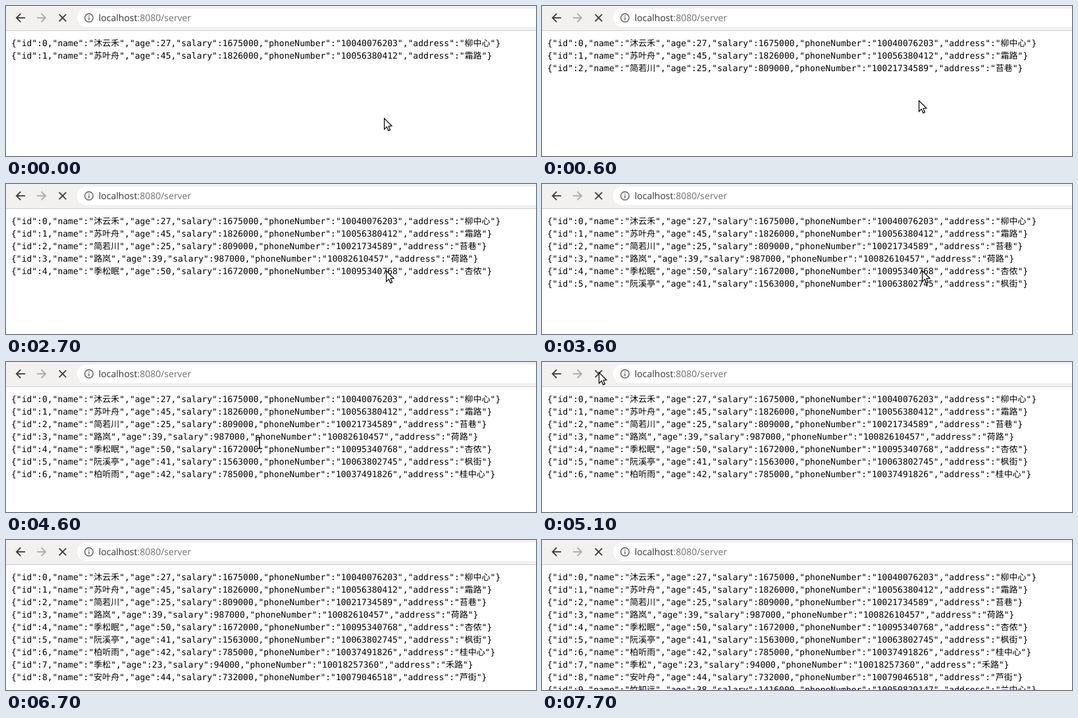
Write an HTML page with a canvas that moves like this. It is 805 by 228 pixels and loops after 8100 ms.

```html
<!DOCTYPE html>
<html lang="zh-CN">
<head>
<meta charset="utf-8">
<title>localhost:8080/server</title>
<style>
html, body { margin: 0; width: 100%; height: 100%; overflow: hidden; background: #fff; }
canvas { display: block; }
</style>
</head>
<body>
<canvas id="stage" width="805" height="228"></canvas>
<script>
const ctx = document.getElementById('stage').getContext('2d');
const LOOP = 8100;
const MONO = '13px "DejaVu Sans Mono", "Noto Sans CJK SC", "Noto Sans CJK", monospace';
const SANS = '14px "Open Sans", "Noto Sans", sans-serif';

// arrival time, name, age, salary, phone, address
const people = [
  [0, '沐云禾', 27, 1675000, '10040076203', '柳中心'],
  [0, '苏叶舟', 45, 1826000, '10056380412', '霜路'],
  [600, '简若川', 25, 809000, '10021734589', '苔巷'],
  [1600, '路岚', 39, 987000, '10082610457', '荷路'],
  [2700, '季松眠', 50, 1672000, '10095340768', '杏侬'],
  [3600, '阮溪亭', 41, 1563000, '10063802745', '枫街'],
  [4600, '柏听雨', 42, 785000, '10037491826', '桂中心'],
  [5600, '季松', 23, 94000, '10018257360', '禾路'],
  [6700, '安叶舟', 44, 732000, '10079046518', '芦街'],
  [7700, '竹知远', 38, 1416000, '10050829147', '兰中心']
];
const rows = people.map(([at, name, age, salary, phoneNumber, address], id) =>
  ({ at, text: JSON.stringify({ id, name, age, salary, phoneNumber, address }) }));

// pointer positions: time, x, y, shape
const pointer = [
  [0, 574, 170, arrow], [400, 571, 163, arrow],
  [600, 572, 143, arrow], [700, 574, 137, arrow],
  [800, 576, 133, arrow], [900, 577, 131, arrow],
  [4300, 561, 130, beam], [4400, 512, 128, beam],
  [4500, 448, 126, beam], [4600, 385, 123, beam],
  [4700, 318, 101, beam], [4800, 248, 73, beam],
  [4900, 178, 44, arrow], [5000, 117, 20, arrow],
  [5100, 86, 15, arrow], [5200, 82, 11, arrow],
  [5300, 76, 8, arrow], [5400, 0, 0, null]
];

function line(points, color, width) {
  ctx.beginPath();
  points.forEach(([x, y]) => ctx.lineTo(x, y));
  ctx.strokeStyle = color;
  ctx.lineWidth = width;
  ctx.stroke();
}

function write(text, x, y, font, color) {
  ctx.font = font;
  ctx.fillStyle = color;
  ctx.fillText(text, x, y);
  return x + ctx.measureText(text).width;
}

function arrow(x, y) {
  ctx.save();
  ctx.translate(x, y);
  ctx.beginPath();
  [[.6, .9], [.6, 17.4], [4.4, 13.8], [7, 19.6], [9.6, 18.5], [7.1, 12.7], [12, 12.3]]
    .forEach(([px, py]) => ctx.lineTo(px, py));
  ctx.closePath();
  ctx.fillStyle = '#fff';
  ctx.fill();
  ctx.strokeStyle = '#000';
  ctx.lineWidth = 1.2;
  ctx.stroke();
  ctx.restore();
}

function beam(x, y) {
  ctx.save();
  ctx.translate(x, y);
  for (const [color, width] of [['#fff', 3.5], ['#000', 1.5]]) {
    line([[0, -7.5], [0, 7.5]], color, width);
    for (const s of [-1, 1]) {
      line([[-4, 8.5 * s], [-1, 8.5 * s], [0, 7.5 * s], [1, 8.5 * s], [4, 8.5 * s]], color, width);
    }
  }
  ctx.restore();
}

function navArrow(cx, dir, color) {
  const at = (x, y) => [cx + x * dir, 18 + y];
  line([at(7, 0), at(-6, 0)], color, 1.8);
  line([at(.3, -6.4), at(-6.1, 0), at(.3, 6.4)], color, 1.8);
}

function toolbar() {
  ctx.fillStyle = '#f2f1f0';
  ctx.fillRect(0, 0, 805, 37);
  ctx.fillStyle = '#d0cfcd';
  ctx.fillRect(0, 37, 805, 1);

  ctx.fillStyle = '#fff';
  ctx.beginPath();
  ctx.roundRect(108, 4, 740, 28, 14);
  ctx.fill();

  navArrow(22, 1, '#3b3b3b');
  navArrow(54, -1, '#b1aaa6');
  line([[80.7, 12.7], [91.3, 23.3]], '#3b3b3b', 1.8);
  line([[91.3, 12.7], [80.7, 23.3]], '#3b3b3b', 1.8);

  ctx.beginPath();
  ctx.arc(126, 18, 6.3, 0, Math.PI * 2);
  ctx.strokeStyle = '#5b5b5b';
  ctx.lineWidth = 1.4;
  ctx.stroke();
  line([[126, 17.2], [126, 21.5]], '#5b5b5b', 1.5);
  line([[126, 14.4], [126, 15.9]], '#5b5b5b', 1.5);

  const x = write('localhost', 140.8, 23, SANS, '#333');
  write(':8080/server', x, 23, SANS, '#707070');
}

function draw(t) {
  ctx.fillStyle = '#fff';
  ctx.fillRect(0, 0, 805, 228);
  toolbar();
  rows.forEach((row, i) => {
    if (t >= row.at) write(row.text, 8, 61 + 19 * i, MONO, '#000');
  });
  const [, x, y, shape] = pointer.filter(p => p[0] <= t).pop();
  if (shape) shape(x, y);
}

// keeps fractional glyph advances
ctx.textRendering = 'geometricPrecision';

function tick() {
  draw(performance.now() % LOOP);
  requestAnimationFrame(tick);
}
tick();
</script>
</body>
</html>
```
